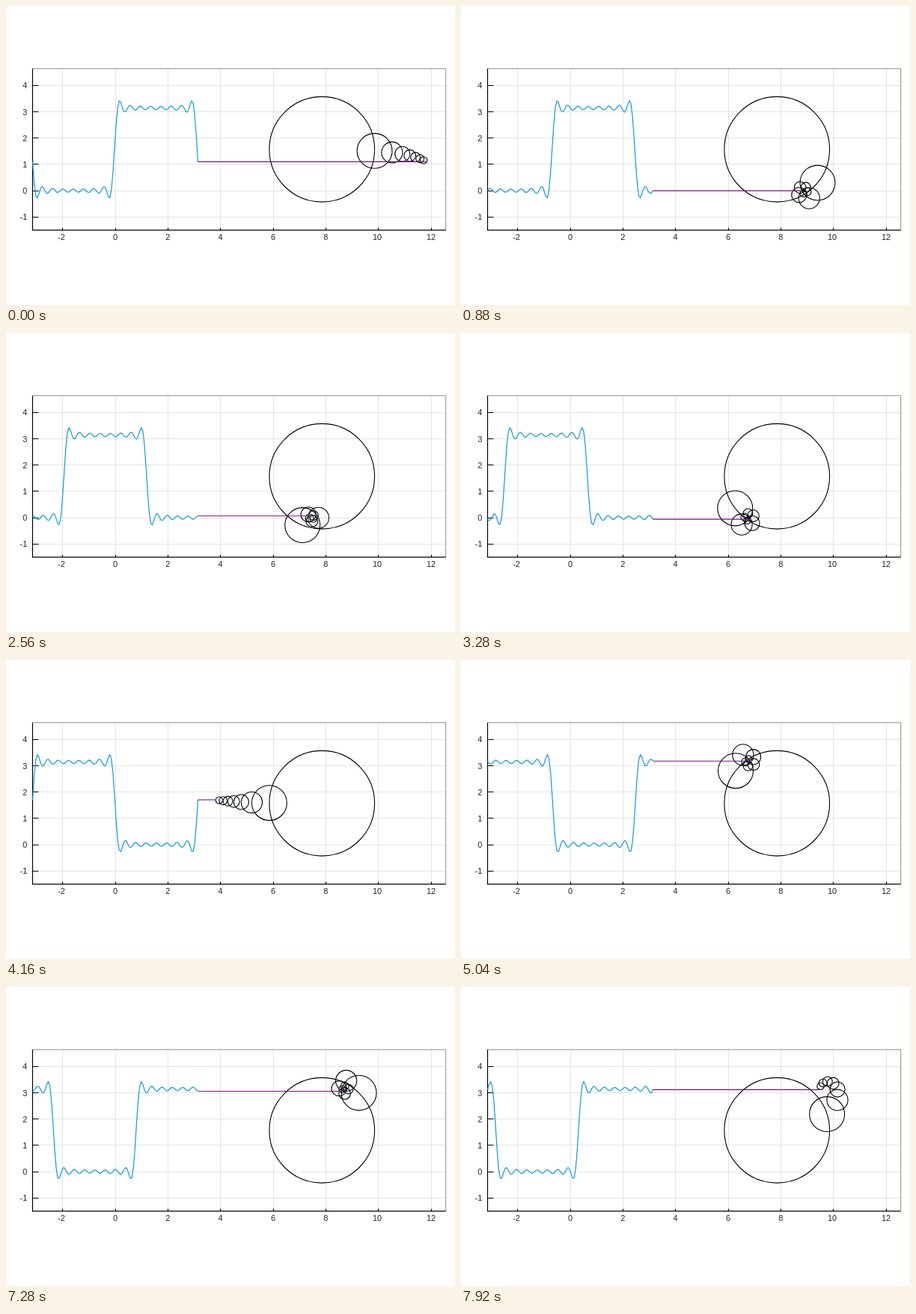
These frames come from a looping animation (600 by 400 pixels, 8 s). An HTML page:

```html
<!DOCTYPE html>
<html lang="en">
<head>
<meta charset="utf-8">
<title>Square wave from rotating circles</title>
<style>
  html, body { margin: 0; width: 100%; height: 100%; overflow: hidden; background: #fff; }
  svg { display: block; width: 600px; height: 400px; }
  text { font: 11px "Liberation Sans", Arial, sans-serif; fill: #262626; }
  path, circle { fill: none; }
  #grid { stroke: #e4e4e4; }
  #frame { stroke: #8a8a8a; }
  #axes { stroke: #000; stroke-width: 1.2; }
  #wave { stroke: #1299e0; stroke-width: 1.2; stroke-linejoin: round; }
  #link { stroke: #7a1080; stroke-width: 1.1; }
  #circles circle { stroke: #000; stroke-width: 1.1; }
  #dots circle { fill: #3a8fc0; opacity: .7; }
</style>
</head>
<body>
<svg viewBox="0 0 600 400">
  <path id="grid"/>
  <path id="frame"/>
  <g id="labels"></g>
  <path id="axes"/>
  <path id="wave"/>
  <g id="circles"></g>
  <path id="link"/>
  <g id="dots"></g>
</svg>
<script>
const PI = Math.PI;
const UNIT = 35.17;
const X0 = 146, Y0 = 247;
const LEFT = 35.5, RIGHT = 587.7, TOP = 83.8, BOTTOM = 299.8;
const TERMS = 8;
const STEP_MS = 80, STEPS = 100;
const START = 0.03, TURN = 0.06;
const SAMPLES = 105;

const $ = id => document.getElementById(id);
const px = x => X0 + x * UNIT;
const py = y => Y0 - y * UNIT;
const crisp = v => Math.floor(v) + 0.5;
const order = i => 2 * i + 1;

function add(parent, tag, attrs) {
  const el = document.createElementNS("http://www.w3.org/2000/svg", tag);
  for (const key in attrs) el.setAttribute(key, attrs[key]);
  return parent.appendChild(el);
}

function label(text, x, y, anchor) {
  add($("labels"), "text", { x, y, "text-anchor": anchor }).textContent = text;
}

function drawPlot() {
  let grid = "", axes = `M${LEFT} ${TOP}V${BOTTOM}H${RIGHT}`;
  for (let x = -2; x <= 12; x += 2) {
    const gx = crisp(px(x));
    grid += `M${gx} ${TOP}V${BOTTOM}`;
    axes += `M${gx} ${BOTTOM}v-3`;
    const nudge = x === -2 || x === 10 ? -1.6 : 0;
    label(x, px(x) + nudge, 313, "middle");
  }
  for (let y = -1; y <= 4; y++) {
    const gy = crisp(py(y));
    grid += `M${LEFT} ${gy}H${RIGHT}`;
    axes += `M${LEFT} ${gy}h8`;
    label(y, 28.3, py(y) + 4.1, "end");
  }
  $("grid").setAttribute("d", grid);
  $("frame").setAttribute("d", `M${LEFT} ${TOP}H${RIGHT}V${BOTTOM}`);
  $("axes").setAttribute("d", axes);
}

function series(phase) {
  let sum = PI / 2;
  for (let i = 0; i < TERMS; i++) sum += 2 / order(i) * Math.sin(order(i) * phase);
  return sum;
}

const circles = [], dots = [];
for (let i = 0; i < TERMS; i++) {
  circles.push(add($("circles"), "circle", { r: 2 / order(i) * UNIT }));
  dots.push(add($("dots"), "circle", { r: 0.9 }));
}

function place(el, x, y) {
  el.setAttribute("cx", px(x).toFixed(2));
  el.setAttribute("cy", py(y).toFixed(2));
}

function draw(phase) {
  let d = "";
  for (let i = 0; i <= SAMPLES; i++) {
    const x = -PI + 2 * PI * i / SAMPLES;
    d += `${i ? "L" : "M"}${px(x).toFixed(2)} ${py(series(x + phase)).toFixed(2)}`;
  }
  $("wave").setAttribute("d", d);

  let x = 2.5 * PI, y = PI / 2;
  for (let i = 0; i < TERMS; i++) {
    const n = order(i);
    place(circles[i], x, y);
    x += 2 / n * Math.cos(n * phase);
    y -= 2 / n * Math.sin(n * phase);
    place(dots[i], x, y);
  }
  $("link").setAttribute("d", `M${px(PI)} ${py(y)}H${px(x)}`);
}

let shown = -1;
function tick() {
  const step = Math.floor(performance.now() / STEP_MS) % STEPS;
  if (step !== shown) {
    shown = step;
    draw(START + TURN * step);
  }
  requestAnimationFrame(tick);
}

drawPlot();
tick();
</script>
</body>
</html>
```
